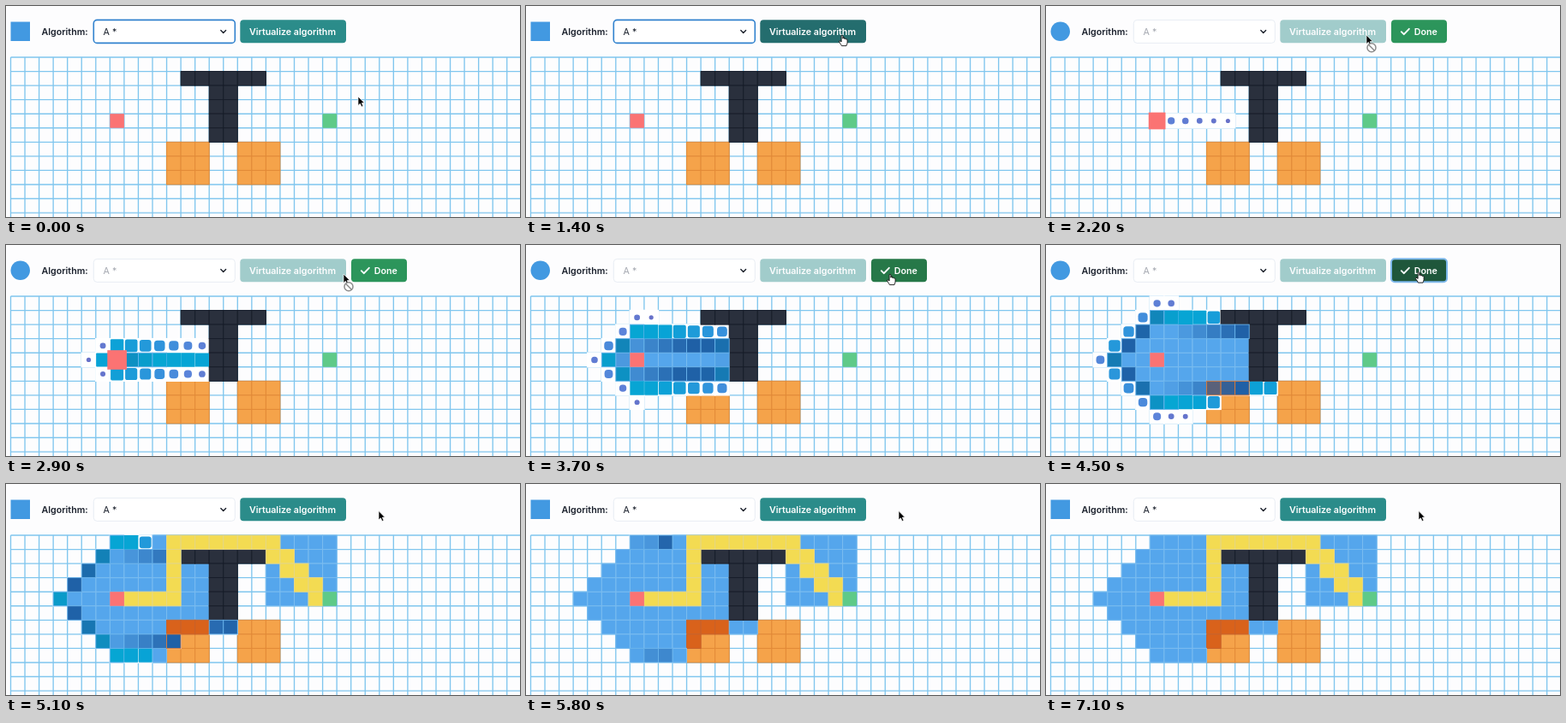
Animation, 600 px wide and 247 px high, one loop 7.2 s. Source, as an HTML page with a canvas:

```html
<!DOCTYPE html>
<html lang="en">
<head>
<meta charset="utf-8">
<title>Pathfinding visualizer</title>
<style>
  html, body { margin: 0; width: 100%; height: 100%; overflow: hidden; background: #fdfdfe; }
  canvas, svg { position: absolute; left: 0; top: 0; width: 600px; height: 247px; }
  text { font: 600 10.7px Inter, sans-serif; fill: #fff; }
  .dark { fill: #1a202c; }
  .icon { fill: none; stroke-linecap: round; stroke-linejoin: round; }
</style>
</head>
<body>
<canvas id="board"></canvas>
<svg viewBox="0 0 600 247">
  <rect id="logo" x="5.5" y="18.5" width="22.5" height="22.5" fill="#4299e1"/>
  <text class="dark" x="41.5" y="33.5">Algorithm:</text>
  <rect id="select" x="102.3" y="16.4" width="165" height="27" rx="4" fill="#fff"/>
  <text id="choice" x="113.5" y="33.5" style="font-weight:400">A *</text>
  <path class="icon" d="M250.8 28.6l2.9 2.9 2.9-2.9" stroke="#1a202c" stroke-width="1.4"/>
  <g id="run">
    <rect id="runBox" x="273.3" y="16.3" width="123.7" height="27" rx="4"/>
    <text x="283.9" y="33.5">Virtualize algorithm</text>
  </g>
  <g id="done">
    <rect id="doneBox" x="403" y="16.3" width="65" height="27" rx="4"/>
    <path class="icon" d="M414.8 30.2l3 3 6-6.4" stroke="#fff" stroke-width="1.9"/>
    <text x="429.8" y="33.5">Done</text>
  </g>
  <g id="cursor">
    <path id="arrow" d="M0 0V10.5L2.4 8.3 4 12 5.9 11.2 4.3 7.6H7.4Z" fill="#000" stroke="#fff" stroke-width=".7"/>
    <path id="hand" d="M-.9 .8Q0-.6 .9 .8V4.2Q2-.0 2.7 4.5 4 3.4 4.4 5 6 4.2 6.1 6V9Q5.8 10.8 5 12.6H-.6Q-1.4 10.6-3.5 8 -3.8 6.2-1.9 7.1L-.9 8Z" fill="#fff" stroke="#111" stroke-width=".9"/>
    <g id="blocked" fill="#fff" stroke="#8c8c8c" stroke-width="1.5">
      <circle cx="6" cy="14.8" r="5"/><path d="M2.5 11.3l7 7"/>
    </g>
  </g>
</svg>
<script>
const LOOP = 7200, PRESS = 1700, START = 1900, SKIP = 4700;
const CELL = 16.55, LEFT = 5.5, TOP = 60;
const VISIT_TIME = 1500, GROW_TIME = 750, FIRST_VISIT = 2050, VISIT_STEP = 36.5;
const BLUE = '#55a6ec', BURNT = '#d9621b';

const $ = id => document.getElementById(id);
const key = (c, r) => c + ',' + r;
const range = (a, b) => Array.from({length: b - a + 1}, (_, i) => a + i);
const block = (c1, c2, r1, r2) => range(r1, r2).flatMap(r => range(c1, c2).map(c => [c, r]));
const pairs = (c1, c2, upper, lower) => range(c1, c2).flatMap(c => [[c, upper], [c, lower]]);

const walls = [...block(12, 17, 1, 1), ...block(14, 15, 2, 5)];
const weights = [...block(11, 13, 6, 8), ...block(16, 18, 6, 8)];
const weightKeys = new Set(weights.map(p => key(...p)));

// Cells in the order the search reaches them, one line per cost level.
const order = [
  ...block(8, 13, 4, 4),
  [6, 4], ...pairs(7, 13, 3, 5),
  [6, 3], [6, 5], [5, 4], ...pairs(7, 13, 2, 6),
  [5, 3], [5, 5], [6, 2], [6, 6], [4, 4], ...pairs(7, 10, 1, 7), [14, 6], [15, 6], [11, 1], [11, 7],
  [4, 3], [4, 5], [5, 2], [5, 6], [6, 1], [6, 7], [3, 4], [7, 8], [7, 0], [8, 0], [8, 8], [9, 8]
];
const visits = order.map(([c, r], i) => ({c, r, at: FIRST_VISIT + i * VISIT_STEP}));
visits.push({c: 9, r: 0, at: 4640});

// Everything else the search covers appears at once when it is skipped.
const reached = new Set(visits.map(v => key(v.c, v.r)));
const skipped = [...block(10, 22, 0, 0), ...block(18, 22, 1, 4), [10, 8]];
for (const [c, r] of skipped)
  if (!reached.has(key(c, r))) visits.push({c, r, at: SKIP, instant: true});

const path = [
  ...block(8, 11, 4, 4), ...block(11, 11, 0, 3), ...block(12, 18, 0, 0), [18, 1],
  ...[1, 2, 3].flatMap(r => [[18 + r, r], [18 + r, r + 1]])
];

const visitColors = [
  [0, '#6870c8'], [190, '#5c84da'], [375, '#2f94dc'], [620, '#08a3d6'],
  [790, '#06a6d3'], [880, '#1186ba'], [1000, '#1f62a8'], [1130, '#1f60a6']
];
const pointer = [
  [0, 411, 106], [200, 411, 106], [1000, 369, 34], [2000, 369, 34], [2700, 394, 34],
  [2900, 394, 34], [3500, 425, 34], [3700, 425, 34], [4300, 435, 31.5], [LOOP, 435, 31.5]
];

const smooth = k => k * k * (3 - 2 * k);
const rgb = hex => [1, 3, 5].map(i => parseInt(hex.slice(i, i + 2), 16));
function mix(a, b, k) {
  const to = rgb(b);
  return `rgb(${rgb(a).map((v, i) => Math.round(v + (to[i] - v) * k))})`;
}
function segment(stops, t) {
  const i = Math.max(1, stops.findIndex(s => s[0] >= t));
  const a = stops[i - 1], b = stops[i];
  return [a, b, (t - a[0]) / (b[0] - a[0])];
}
function visitColor(age, final) {
  const [a, b, k] = segment([...visitColors, [VISIT_TIME, final]], age);
  return mix(a[1], b[1], k);
}

const board = $('board'), ctx = board.getContext('2d');
const ratio = window.devicePixelRatio || 1;
board.width = 600 * ratio;
board.height = 247 * ratio;
ctx.scale(ratio, ratio);

const cellX = c => LEFT + c * CELL;
const cellY = r => TOP + r * CELL;

function fillCell(c, r, fill, line) {
  ctx.fillStyle = fill;
  ctx.fillRect(cellX(c), cellY(r), CELL, CELL);
  if (!line) return;
  ctx.strokeStyle = line;
  ctx.lineWidth = 1;
  ctx.strokeRect(cellX(c), cellY(r), CELL, CELL);
}

function fillCentered(c, r, size, radius, fill) {
  ctx.fillStyle = fill;
  ctx.beginPath();
  ctx.roundRect(cellX(c) + (CELL - size) / 2, cellY(r) + (CELL - size) / 2, size, size, radius);
  ctx.fill();
}

function drawGrid() {
  ctx.strokeStyle = '#80c6ee';
  ctx.lineWidth = 1.35;
  ctx.beginPath();
  for (let c = 0; c <= 36; c++) { ctx.moveTo(cellX(c), TOP); ctx.lineTo(cellX(c), 247); }
  for (let r = 0; r <= 11; r++) { ctx.moveTo(LEFT, cellY(r)); ctx.lineTo(600, cellY(r)); }
  ctx.stroke();
}

function drawVisit({c, r, at}, t) {
  const age = t - at, grown = 1 - Math.max(0, 1 - age / GROW_TIME) ** 1.5;
  const heavy = weightKeys.has(key(c, r));
  const size = CELL * (0.3 + 0.7 * grown);
  fillCentered(c, r, size, size / 2 * (1 - grown * grown), visitColor(age, heavy ? BURNT : BLUE));
  if (age > GROW_TIME) {
    ctx.strokeStyle = heavy ? '#dd7a35' : '#68b3ec';
    ctx.lineWidth = 0.9;
    ctx.strokeRect(cellX(c), cellY(r), CELL, CELL);
  }
}

function drawBoard(t) {
  ctx.fillStyle = '#fdfdfe';
  ctx.fillRect(0, 0, 600, 247);
  drawGrid();
  const started = visits.filter(v => t >= v.at);
  const settled = v => v.instant || t - v.at >= VISIT_TIME;
  const active = started.filter(v => !settled(v));
  const startedKeys = new Set(started.map(v => key(v.c, v.r)));

  for (const [c, r] of weights)
    if (!startedKeys.has(key(c, r))) fillCell(c, r, '#f5a34a', '#e38a37');
  for (const {c, r} of active) fillCentered(c, r, CELL + 1.4, 0, '#fff');
  for (const v of started.filter(settled)) {
    const heavy = weightKeys.has(key(v.c, v.r));
    fillCell(v.c, v.r, heavy ? BURNT : BLUE, heavy ? '#c8622a' : '#7abcf0');
  }
  for (const [c, r] of walls) fillCell(c, r, '#2a303d', '#171d29');
  for (const v of active) drawVisit(v, t);
  if (t >= SKIP) for (const [c, r] of path) fillCell(c, r, '#f3db52', '#e6d784');

  const pulse = Math.min(1, Math.max(0, (t - 1960) / VISIT_TIME));
  fillCentered(7, 4, CELL * (1 + 0.4 * Math.sin(Math.PI * pulse)), 0, '#fb7373');
  fillCell(22, 4, '#5fca88');
}

function set(id, attributes) {
  for (const name in attributes) $(id).setAttribute(name, attributes[name]);
}
const show = (id, visible) => set(id, {visibility: visible ? 'visible' : 'hidden'});

function drawHeader(t) {
  const running = t >= START && t < SKIP, focused = t < PRESS;
  const [a, b, k] = segment(pointer, t);
  const x = a[1] + (b[1] - a[1]) * smooth(k), y = a[2] + (b[2] - a[2]) * smooth(k);
  const inRow = y > 16 && y < 43.5;
  const overRun = inRow && x > 273 && x < 397;
  const overDone = running && inRow && x > 403 && x < 468;
  const pressed = overDone && t >= 4400, runPressed = t >= PRESS && t < START;
  const ring = on => ({stroke: on ? '#7db8ec' : 'none', 'stroke-width': 2});

  set('logo', {rx: running ? 11.25 : 0});
  set('select', {stroke: focused ? '#3182ce' : '#e6ebf2', 'stroke-width': focused ? 1.6 : 0.9});
  set('choice', {style: `font-weight:400;fill:${running ? '#a5a9b1' : '#1a202c'}`});
  set('run', {opacity: running ? 0.43 : 1});
  set('runBox', {
    fill: running || !overRun ? '#2b8c8a' : runPressed ? '#225556' : '#246d6e',
    ...ring(runPressed)
  });
  show('done', running);
  set('doneBox', {fill: pressed ? '#1f573b' : overDone ? '#267848' : '#2c955b', ...ring(pressed)});

  const hand = overDone || (overRun && !running);
  set('cursor', {transform: `translate(${x} ${y})`});
  show('hand', hand);
  show('arrow', !hand);
  show('blocked', running && overRun);
}

function frame() {
  const t = performance.now() % LOOP;
  drawBoard(t);
  drawHeader(t);
  requestAnimationFrame(frame);
}
frame();
</script>
</body>
</html>
```
